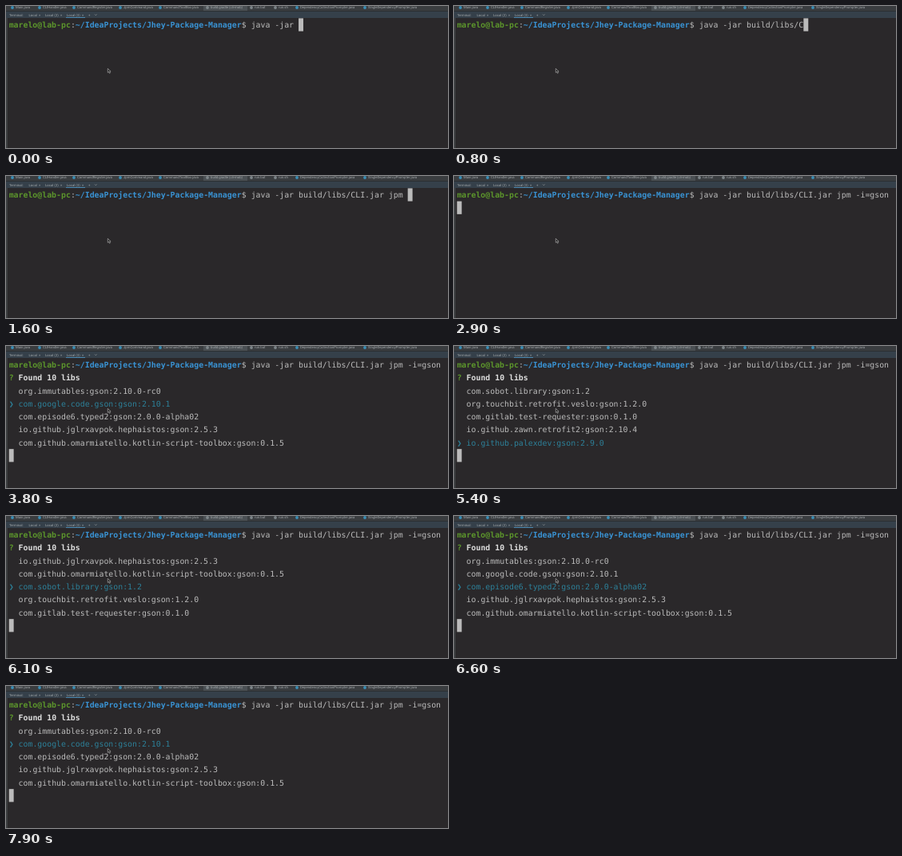
An HTML page for the animation above (8000 ms loop, 553x178 px).

```html
<!DOCTYPE html>
<html lang="en">
<head>
<meta charset="utf-8">
<title>Terminal</title>
<style>
  html, body { margin: 0; width: 100%; height: 100%; overflow: hidden; background: #2a282a; }
  svg { display: block; width: 553px; height: 178px; }
  text { white-space: pre; text-rendering: geometricPrecision; }
  .term { font: 9.866px "DejaVu Sans Mono", monospace; }
  .bold { font-weight: 700; }
  .ui { font: 4.25px Roboto, sans-serif; fill: #a4a9ac; }
</style>
</head>
<body>
<svg id="stage" viewBox="0 0 553 178"></svg>
<script>
const LOOP = 8000;
const COL = 5.94, ROW = 16.25, LEFT = 3.7, TOP = 15.4, BASELINE = TOP + 11.8;
const GREEN = "#5c962c", BLUE = "#3993d4", TEAL = "#2d8099", WHITE = "#dedede", GREY = "#bbbbbb";

const stage = document.getElementById("stage");

function add(tag, attrs, content = "") {
  const node = document.createElementNS("http://www.w3.org/2000/svg", tag);
  for (const key in attrs) node.setAttribute(key, attrs[key]);
  node.textContent = content;
  return stage.appendChild(node);
}

const rect = (x, y, width, height, fill) => add("rect", { x, y, width, height, fill });
const label = (x, y, content) => add("text", { x, y, class: "ui" }, content);
const term = (col, row, content, fill = GREY, bold = false) => add("text", {
  x: LEFT + col * COL, y: BASELINE + row * ROW, fill, class: bold ? "term bold" : "term"
}, content);

// Editor tabs and terminal header
rect(0, 0, 553, 6, "#3a3d40");
rect(247, 0, 55, 6, "#4b5054");
rect(0, 6, 553, 1, "#2b2f32");
rect(0, 7, 553, 8, "#35404a");
rect(75, 14, 24, 1, "#4a88b0");
rect(0, 15, 2, 163, "#3c3f41");

const tabs = [
  [12, "Main.java"], [46, "CLIHandler.java"], [89, "CommandRegister.java"],
  [147, "JpmCommand.java"], [197, "CommandToolBox.java"], [256, "build.gradle (cli-mob)"],
  [311, "run.bat"], [341, "run.sh"], [368, "DependencyCollectionPrompter.java"],
  [453, "SingleDependencyPrompter.java"]
];
for (const [x, name] of tabs) {
  const isClass = name.endsWith(".java");
  add("circle", { cx: x - 4, cy: 2, r: 1.9, fill: isClass ? "#3a8fb7" : "#7d8589" });
  label(x, 3.4, name);
}

label(4, 12.6, "Terminal:");
label(28.5, 12.6, "Local");
label(49, 12.6, "Local (2)");
label(76, 12.6, "Local (3)");
for (const x of [41, 68, 95]) label(x, 12.6, "×");
label(103, 12.6, "+");
add("path", { d: "M111 10.4l1.3 1.3 1.3-1.3", fill: "none", stroke: "#a4a9ac", "stroke-width": 0.6 });

// Shell prompt
const USER = "marelo@lab-pc", PATH = "~/IdeaProjects/Jhey-Package-Manager";
const pathCol = USER.length + 1;
const dollarCol = pathCol + PATH.length;
const commandCol = dollarCol + 2;
term(0, 0, USER, GREEN, true);
term(USER.length, 0, ":");
term(pathCol, 0, PATH, BLUE, true);
term(dollarCol, 0, "$");

const COMMAND = "java -jar build/libs/CLI.jar jpm -i=gson";
const command = term(commandCol, 0, "");

// [time, characters shown]; larger jumps are tab completions
const typing = [
  [0, 10], [100, 11], [200, 12], [300, 16], [500, 17], [600, 21], [800, 22], [900, 23],
  [1000, 29], [1200, 30], [1300, 31], [1500, 32], [1600, 33], [1800, 34], [1900, 35],
  [2000, 36], [2200, 37], [2300, 38], [2400, 39], [2500, 40]
];
const ENTER = 2800, LISTED = 3400;

// Result list
const libs = [
  "org.immutables:gson:2.10.0-rc0",
  "com.google.code.gson:gson:2.10.1",
  "com.episode6.typed2:gson:2.0.0-alpha02",
  "io.github.jglrxavpok.hephaistos:gson:2.5.3",
  "com.github.omarmiatello.kotlin-script-toolbox:gson:0.1.5",
  "com.sobot.library:gson:1.2",
  "org.touchbit.retrofit.veslo:gson:1.2.0",
  "com.gitlab.test-requester:gson:0.1.0",
  "io.github.zawn.retrofit2:gson:2.10.4",
  "io.github.palexdev:gson:2.9.0"
];
const PAGE = 5;
const selection = [
  [0, 0], [3700, 1], [3900, 2], [4100, 3], [4300, 4], [4500, 5], [4700, 6], [4900, 7],
  [5100, 8], [5300, 9], [5500, 8], [5700, 7], [5900, 6], [6100, 5], [6300, 4],
  [6400, 3], [6600, 2], [7000, 1]
];

const heading = [term(0, 1, "?", GREEN, true), term(2, 1, "Found 10 libs", WHITE, true)];
const rows = Array.from({ length: PAGE }, (_, i) => term(2, i + 2, ""));
const pointer = term(0, 2, "❯", TEAL);
const caret = rect(LEFT, TOP, COL, 16.2, GREY);

add("path", {
  d: "M127.3 78.4v5l1.2-1 .9 2 1-.5-.9-1.9h1.6z",
  fill: "#1c1c1c", stroke: "#c0c0c0", "stroke-width": 0.6
});

const valueAt = (steps, t) => steps.reduce((value, [time, next]) => t >= time ? next : value, steps[0][1]);
const show = (node, visible) => node.setAttribute("visibility", visible ? "visible" : "hidden");

function render(t) {
  const typed = valueAt(typing, t);
  const listed = t >= LISTED;
  command.textContent = COMMAND.slice(0, typed);

  const caretCol = t < ENTER ? commandCol + typed : 0;
  const caretRow = listed ? PAGE + 2 : t < ENTER ? 0 : 1;
  caret.setAttribute("x", LEFT + caretCol * COL);
  caret.setAttribute("y", TOP + caretRow * ROW);

  const selected = valueAt(selection, t);
  const first = Math.max(0, Math.min(selected - 2, libs.length - PAGE));
  rows.forEach((row, i) => {
    row.textContent = libs[first + i];
    row.setAttribute("fill", first + i === selected ? TEAL : GREY);
  });
  pointer.setAttribute("y", BASELINE + (selected - first + 2) * ROW);
  [...heading, ...rows, pointer].forEach(node => show(node, listed));
}

const start = performance.now();
function tick() {
  render((performance.now() - start) % LOOP);
  requestAnimationFrame(tick);
}
render(0);
requestAnimationFrame(tick);
</script>
</body>
</html>
```
